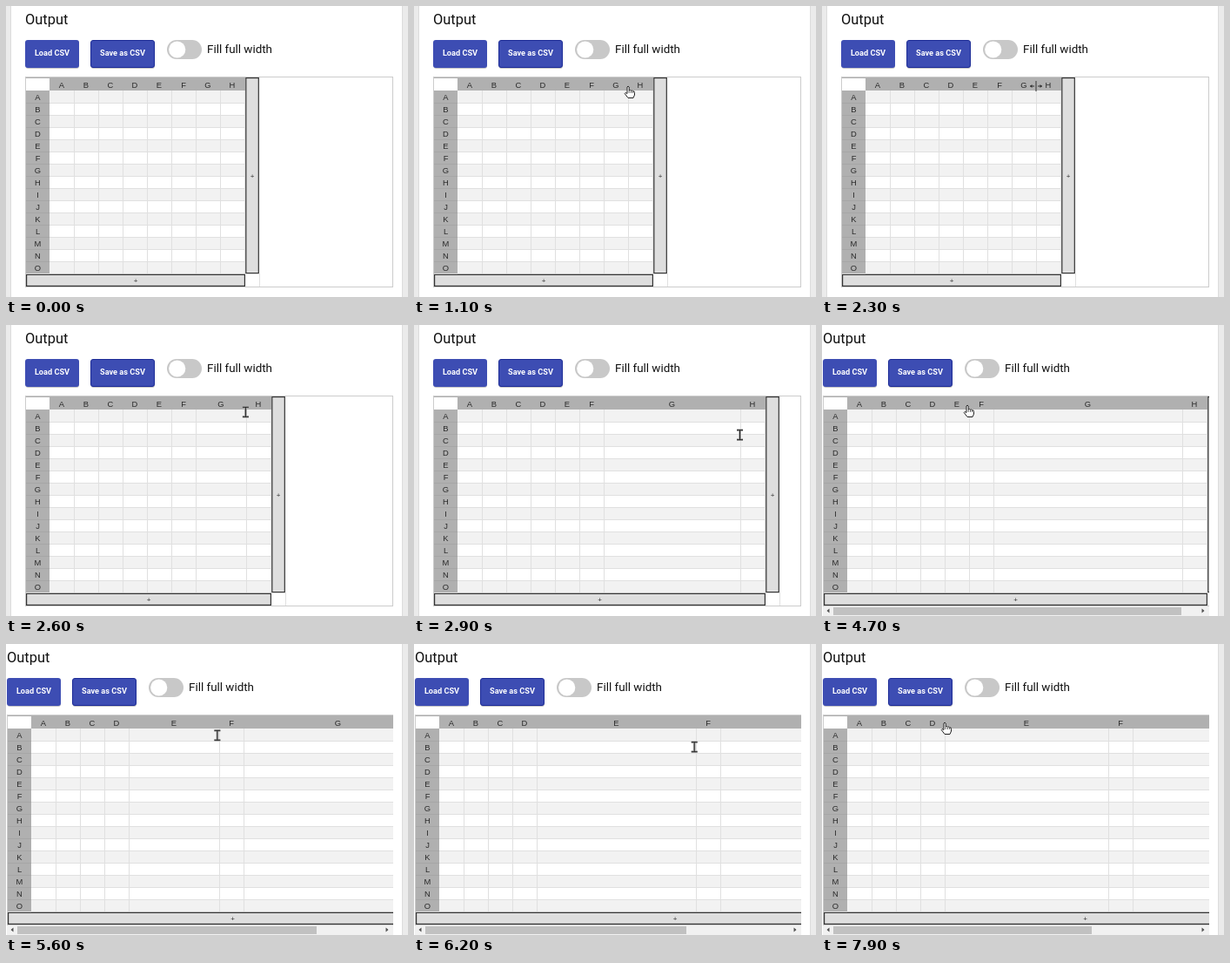
Animation, 462 px wide and 334 px high, one loop 8 s. Source, as an HTML page:

```html
<!DOCTYPE html>
<html lang="en">
<head>
<meta charset="utf-8">
<title>Resizable table columns</title>
<style>
html, body { margin: 0; width: 100%; height: 100%; overflow: hidden; background: #fff; }
svg { display: block; }
rect, .lines { shape-rendering: crispEdges; }
text { font-family: Roboto, sans-serif; fill: #111; }
.title { font-size: 16.4px; }
.switch { font-size: 13.4px; }
.btn rect { fill: #3d4db3; shape-rendering: auto; }
.btn .shadow { fill: #c8c8c8; }
.btn .focus { stroke: #1c2b96; }
.btn text { font-size: 9.2px; font-weight: 700; fill: #fff; text-anchor: middle; }
.cell { font: 9.4px "Liberation Sans", Arial, sans-serif; fill: #2b2b2b; text-anchor: middle; }
.plus { font: 8px "Liberation Sans", Arial, sans-serif; fill: #333; text-anchor: middle; }
.add { fill: #dedede; stroke: #333; stroke-width: 1.2; shape-rendering: auto; }
.lines { fill: none; stroke: #e0e0e0; }
.strip { fill: #ebebeb; }
.head { fill: #b0b0b0; }
#cursors path { stroke-linejoin: round; }
</style>
</head>
<body>
<svg width="462" height="334" viewBox="0 0 462 334">
  <g id="page">
    <rect class="strip" width="5" height="334"/>
    <rect x="5" width="1" height="334" fill="#dcdcdc"/>
    <text class="title" x="22" y="21">Output</text>
    <g class="btn">
      <rect class="shadow" x="22.5" y="40" width="61.5" height="32" rx="3"/>
      <rect class="shadow" x="97.500" y="40" width="73.500" height="32" rx="3"/>
      <rect x="22" y="39" width="62" height="32" rx="3"/>
      <rect class="focus" x="97.5" y="39.5" width="73" height="31" rx="2.5"/>
      <text x="53" y="57">Load CSV</text>
      <text x="134" y="57">Save as CSV</text>
    </g>
    <rect x="185" y="39" width="40" height="22" rx="11" fill="#c8c8c8" style="shape-rendering:auto"/>
    <circle cx="196.7" cy="50" r="9.6" fill="#fff"/>
    <text class="switch" x="231" y="54">Fill full width</text>

    <path class="lines" d="M22.5 323V81.5H470M22 322.5H470" style="stroke:#ccc"/>
    <rect id="band" class="head" x="23" y="82" height="15"/>
    <rect x="23" y="83" width="27" height="14" fill="#fff"/>
    <g id="rows"></g>
    <path id="grid" class="lines"/>
    <rect class="head" x="23" y="97" width="27" height="210"/>
    <g id="labels"></g>
    <rect id="addCol" class="add" y="82.6" width="14.5" height="224"/>
    <text id="plusCol" class="plus" y="197.5">+</text>
    <rect id="addRow" class="add" x="23.6" y="308.4" height="13"/>
    <text id="plusRow" class="plus" y="318">+</text>
    <path id="edge" class="lines"/>
  </g>
  <rect x="445" y="79" width="10" height="255" fill="#fff"/>
  <rect id="frameRight" x="444" y="81" width="1" height="242" fill="#ccc"/>
  <rect class="strip" x="455" width="7" height="334"/>
  <rect x="455" width="1" height="334" fill="#dcdcdc"/>
  <g id="scroll">
    <rect x="1" y="323" width="444" height="11" fill="#f1f1f1"/>
    <rect id="thumb" x="13" y="324" height="9" fill="#c1c1c1"/>
    <path d="M8.5 325.5v5l-3-2.5zM436.5 325.5v5l3-2.5z" fill="#505050"/>
  </g>
  <g id="cursors">
    <g id="arrow"><path d="M0 0V11L2.6 8.6L4.4 12.6L6.3 11.7L4.5 7.9H8Z" fill="#fff" stroke="#222"/></g>
    <g id="hand"><path d="M-1 1Q0-.8 1.2 1V5Q2.5 4 3.5 5.3Q4.8 4.5 5.7 5.9Q7.5 5.4 7.5 7.5V10L6 13.5H0L-3.8 8.5Q-3.5 6.5-1 8.5Z" fill="#fff" stroke="#222"/><path d="M1.2 5v3M3.5 5.5v2.5M5.6 6v2" stroke="#222" stroke-width=".7"/></g>
    <g id="beam"><path d="M-3.5-5.500H3.5M-3.5 5.500H3.5M0-5.500V5.500" stroke="#aaa" stroke-width="2.8"/><path d="M-3.5-5.500H3.5M-3.5 5.500H3.5M0-5.500V5.500" stroke="#222"/></g>
    <g id="resize"><path d="M0-6V6M-7 0H-2M2 0H7" stroke="#333" fill="none"/><path d="M-7 0l2.500-2v4zM7 0l-2.500-2v4z" fill="#333"/></g>
  </g>
</svg>
<script>
const LOOP = 8000, STEP = 100, COL = 28, ROW = 14, LEFT = 50, TOP = 97, HEAD_Y = 98;
const $ = id => document.getElementById(id);
const set = (el, attrs) => { for (const k in attrs) el.setAttribute(k, attrs[k]); };
const clamp = (v, lo, hi) => Math.min(hi, Math.max(lo, v));
const show = (el, on) => { el.style.display = on ? "" : "none"; };

function add(parent, tag, attrs, text = "") {
  const el = document.createElementNS("http://www.w3.org/2000/svg", tag);
  set(el, attrs);
  el.textContent = text;
  return parent.appendChild(el);
}

function ease(t, from, to) {
  const p = clamp((t - from) / (to - from), 0, 1);
  return p * p * (3 - 2 * p);
}

const bands = [], heads = [];
for (let r = 0; r < 15; r++) {
  const y = TOP + r * ROW;
  if (r % 2 === 0) bands.push(add($("rows"), "rect", { x: LEFT, y, height: ROW, fill: "#f2f2f2" }));
  if (r) add($("labels"), "rect", { x: 23, y, width: 27, height: 1, fill: "#a6a6a6" });
  add($("labels"), "text", { class: "cell", x: 36.5, y: y + 10.5 }, String.fromCharCode(65 + r));
}
for (let c = 0; c < 8; c++)
  heads.push(add($("labels"), "text", { class: "cell", y: 93.5 }, String.fromCharCode(65 + c)));

function drawTable(growE, growG) {
  const right = 275 + growE + growG;
  const shift = Math.round(clamp(right - 428, 0, 21));
  set($("page"), { transform: `translate(${-shift} 0)` });

  let x = LEFT, d = "";
  heads.forEach((head, c) => {
    const w = COL + (c === 4 ? growE : c === 6 ? growG : 0);
    set(head, { x: x + w / 2 });
    x += w;
    d += `M${x + .5} ${TOP}V307`;
  });
  for (let r = 1; r <= 15; r++) d += `M${LEFT} ${TOP + r * ROW + .5}H${right}`;
  set($("grid"), { d });
  bands.forEach(b => set(b, { width: right - LEFT }));
  set($("band"), { width: right - 23 });

  set($("addCol"), { x: right + .8 });
  set($("plusCol"), { x: right + 8 });
  set($("addRow"), { width: right - 24.2 });
  set($("plusRow"), { x: (23 + right) / 2 });
  set($("edge"), { d: `M${right + 16.5} 307V322` });

  show($("scroll"), shift);
  show($("frameRight"), !shift);
  set($("thumb"), { width: 419 * 443 / right });
  return right - shift;
}

function cursorShape(t, x, y, right) {
  if (t < 300) return "";
  const onEdge = t >= 1800 && t < 3000 || t >= 4800 && t < 6000;
  if (y < HEAD_Y) return onEdge ? "resize" : "hand";
  return x > Math.min(right, 425) ? "arrow" : "beam";
}

function draw(t) {
  const dragG = ease(t, 2400, 3200), dragE = ease(t, 4900, 6350);
  const right = drawTable(Math.round(160 * dragE), Math.round(189 * dragG));

  // Enter, drag G, go back, drag E, go back
  const enter = ease(t, 300, 1000), back = ease(t, 3400, 3700), last = ease(t, 6500, 7200);
  const x = 394 - 148 * enter + 188 * dragG - 267 * back + 160 * dragE - 186 * last;
  const y = 190 - 98 * enter + 50 * dragG - 50 * back + 27 * dragE - 29 * last;
  const shape = cursorShape(t, x, y, right);
  for (const el of $("cursors").children) show(el, el.id === shape);
  set($("cursors"), { transform: `translate(${x} ${y})` });
}

const start = performance.now();
function tick() {
  const t = (performance.now() - start) % LOOP;
  draw(Math.floor(t / STEP) * STEP);
  requestAnimationFrame(tick);
}
tick();
</script>
</body>
</html>
```
